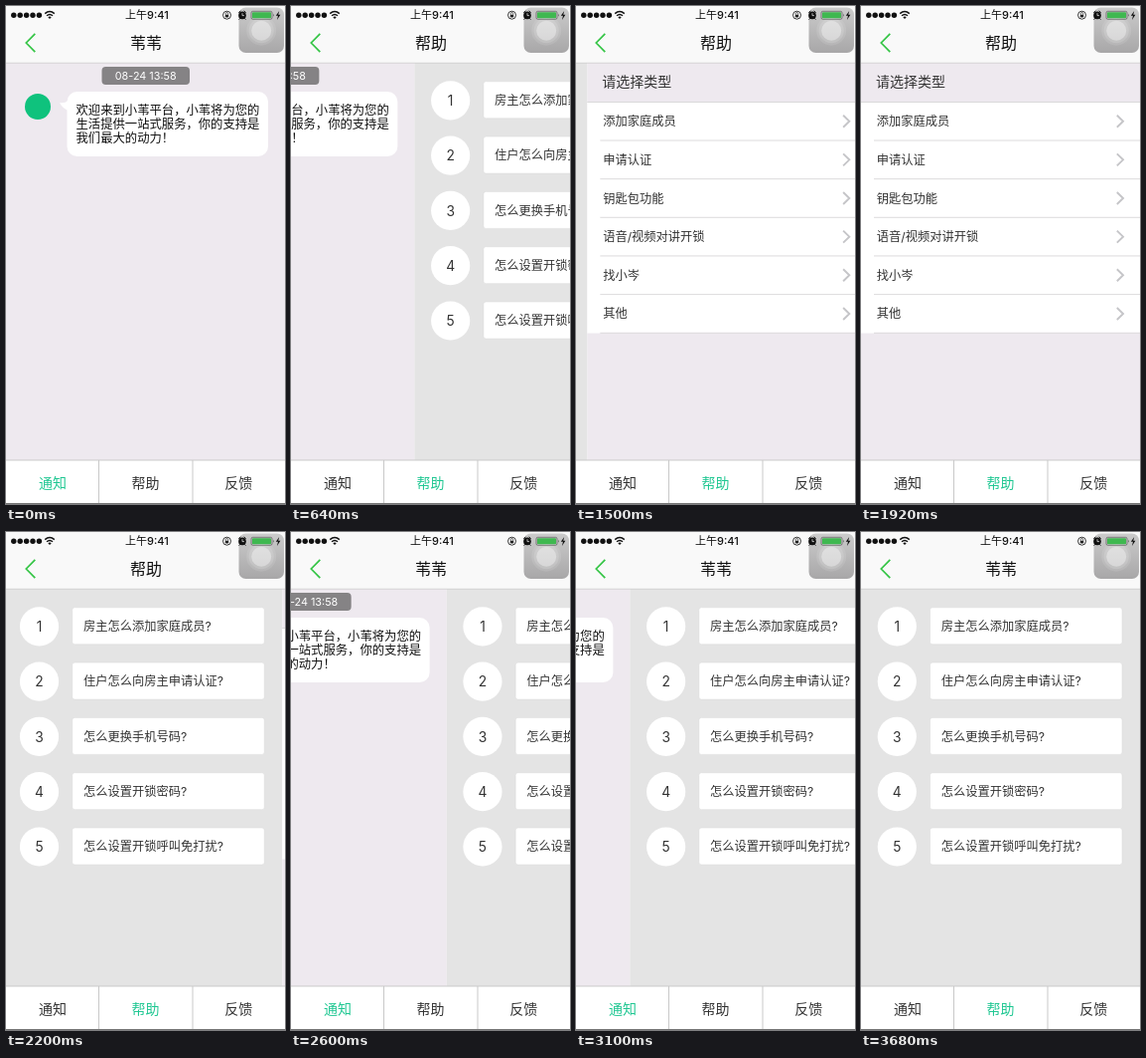
Recreate the animation shown at these times as an HTML page. Size 281 px wide and 500 px high, loop 3800 ms.

```html
<!DOCTYPE html>
<html lang="zh-CN">
<head>
<meta charset="utf-8">
<title>帮助</title>
<style>
html, body { margin: 0; width: 100%; height: 100%; overflow: hidden; background: #fff; }
svg { display: block; width: 100%; height: 100%; }
text { font-family: Inter, "Noto Sans CJK SC", "Noto Sans CJK", sans-serif; fill: #333; white-space: pre; }
</style>
</head>
<body>
<svg id="stage" viewBox="0 0 281 500">
  <defs>
    <clipPath id="view"><rect y="57" width="281" height="399"/></clipPath>
    <linearGradient id="shade" x2="0" y2="1">
      <stop offset="0" stop-color="#cbcbcb"/><stop offset="1" stop-color="#a8a7a8"/>
    </linearGradient>
  </defs>
  <g clip-path="url(#view)"><g id="pages">
    <g id="notice"><rect y="57" width="281" height="399" fill="#eee9ef"/></g>
    <g id="help" transform="translate(281 0)"><rect y="57" width="281" height="399" fill="#e4e4e4"/></g>
    <g id="feedback" transform="translate(562 0)"><rect y="57" width="281" height="399" fill="#eee9ef"/></g>
  </g></g>
  <g id="header">
    <rect width="281" height="57" fill="#f9f9f9"/>
    <path d="M0 57.2H281" stroke="#c8c8c8" stroke-width=".7"/>
    <path d="M29.3 27.8L20.3 37L29.3 46.2" fill="none" stroke="#35c546" stroke-width="1.7"/>
  </g>
  <g id="bar">
    <rect y="456" width="281" height="44" fill="#fff"/>
    <path d="M0 456H281M93.5 456V499M188 456V499" stroke="#c9c9c9"/>
    <path d="M0 499.5H281" stroke="#777"/>
  </g>
  <g id="assist">
    <rect x="234.5" y="1.5" width="45.5" height="45.5" rx="7" fill="url(#shade)"/>
    <circle cx="257.2" cy="24.7" r="15" fill="#fff" fill-opacity=".1"/>
    <circle cx="257.2" cy="24.7" r="12.6" fill="#fff" fill-opacity=".14"/>
    <circle cx="257.2" cy="24.7" r="10" fill="#fff" fill-opacity=".36"/>
  </g>
  <g id="status">
    <path d="M39.2 7.6Q44 3.4 48.8 7.6M41 9.8Q44 7.2 47 9.8" fill="none" stroke="#111" stroke-width="1.5"/>
    <path d="M42.3 11.2Q44 9.8 45.7 11.2L44 13Z" fill="#111"/>
    <circle cx="222.5" cy="9.2" r="4" fill="none" stroke="#222" stroke-width=".9"/>
    <path d="M220.8 8.8h3.4v2.6h-3.4z" fill="#222"/>
    <path d="M221.4 8.8V7.6a1.1 1.1 0 0 1 2.2 0V8.8" fill="none" stroke="#222" stroke-width=".7"/>
    <circle cx="238" cy="9.4" r="3.8" fill="#111"/>
    <path d="M234.3 6.7l2-1.8M241.7 6.7l-2-1.8M235.6 12.4l-1 1.2M240.4 12.4l1 1.2" stroke="#111"/>
    <path d="M238 7.2V9.6H239.9" fill="none" stroke="#ddd" stroke-width=".8"/>
    <rect x="247" y="5.3" width="21" height="8" rx="1.6" fill="none" stroke="#444" stroke-width=".6"/>
    <rect x="248" y="6.3" width="19" height="6" rx=".8" fill="#3fb850"/>
    <path d="M269 7.8q1.4 1.5 0 3z" fill="#444"/>
    <path d="M275.2 5L271.8 9.8H274L272.9 14L276.4 8.8H274.2Z" fill="#111"/>
  </g>
</svg>
<script>
const LOOP = 3800, WIDTH = 281, GREEN = '#1fc792';
const $ = id => document.getElementById(id);

function add(parent, tag, attrs, content = '') {
  const node = document.createElementNS('http://www.w3.org/2000/svg', tag);
  for (const key in attrs) node.setAttribute(key, attrs[key]);
  node.textContent = content;
  return parent.appendChild(node);
}

// Places text by its vertical middle.
function label(parent, content, x, middle, size, attrs = {}) {
  return add(parent, 'text', { x, y: middle + size * 0.37, 'font-size': size, ...attrs }, content);
}
const centred = { 'text-anchor': 'middle' };

function buildNotice(g) {
  add(g, 'rect', { x: 96.5, y: 61, width: 88.5, height: 18, rx: 4, fill: '#858385' });
  label(g, '08-24 13:58', 140.7, 70, 10.8, { ...centred, style: 'fill:#fff' });
  add(g, 'circle', { cx: 32, cy: 101, r: 13, fill: '#0fc27d' });
  add(g, 'path', { d: 'M54 97Q60 98 63 94V105Q57 103 54 97Z', fill: '#fff' });
  add(g, 'rect', { x: 61.5, y: 86, width: 202.5, height: 65, rx: 10, fill: '#fff' });
  ['欢迎来到小苇平台\uff0c小苇将为您的', '生活提供一站式服务\uff0c你的支持是', '我们最大的动力\uff01'].forEach((line, i) =>
    label(g, line, 70.5, 104 + i * 14.2, 12.33, { style: 'fill:#111' }));
}

function buildHelp(g) {
  ['房主怎么添加家庭成员?', '住户怎么向房主申请认证?', '怎么更换手机号码?', '怎么设置开锁密码?', '怎么设置开锁呼叫免打扰?'].forEach((line, i) => {
    const y = 94.8 + i * 55.3;
    add(g, 'circle', { cx: 36.3, cy: y, r: 19.6, fill: '#fff' });
    label(g, i + 1, 36.3, y, 13.8, centred);
    add(g, 'rect', { x: 69.5, y: y - 19, width: 193.5, height: 37, rx: 2.5, fill: '#fff', stroke: '#d9d9d9', 'stroke-width': 0.5 });
    label(g, line, 80.7, y - 0.3, 12.25);
  });
}

function buildFeedback(g) {
  label(g, '请选择类型', 15, 76.3, 14);
  add(g, 'rect', { y: 96.5, width: WIDTH, height: 232, fill: '#fff' });
  add(g, 'path', { d: 'M0 96.5H281', stroke: '#d4d2d4', 'stroke-width': 0.8 });
  ['添加家庭成员', '申请认证', '钥匙包功能', '语音/视频对讲开锁', '找小岑', '其他'].forEach((line, i) => {
    const y = 115.7 + i * 38.65;
    label(g, line, 15.8, y, 12.25);
    add(g, 'path', { d: `M257.8 ${y - 6}l6.2 6l-6.2 6`, fill: 'none', stroke: '#c5c5c8', 'stroke-width': 1.9 });
    add(g, 'path', { d: `M13 ${y + 19.3}H281`, stroke: '#d4d2d4', 'stroke-width': 0.8 });
  });
}

buildNotice($('notice'));
buildHelp($('help'));
buildFeedback($('feedback'));

for (let i = 0; i < 5; i++) add($('status'), 'circle', { cx: 7.8 + i * 6.4, cy: 9.3, r: 2.7, fill: '#111' });
label($('status'), '上午9:41', 142, 9.4, 11, { ...centred, 'font-weight': 500, style: 'fill:#111' });
const title = label($('header'), '', 141, 37, 16, { ...centred, style: 'fill:#111' });
const tabs = ['通知', '帮助', '反馈'].map((name, i) => label($('bar'), name, 47 + i * 93.6, 478.7, 14, centred));
const titles = ['苇苇', '帮助', '反馈'];

// Taps switch title and tab at once; swipes only switch the tab when they settle.
const moves = [
  { start: 480, end: 780, to: 1, tap: true },
  { start: 1225, end: 1660, to: 2 },
  { start: 1920, end: 2220, to: 1, tap: true },
  { start: 2440, end: 2740, to: 0, tap: true },
  { start: 2940, end: 3340, to: 1 }
];

const clamp = u => Math.min(1, Math.max(0, u));
const easeInOut = u => (1 - Math.cos(Math.PI * u)) / 2;
const easeOut = u => 1 - (1 - u) ** 3.19;

function render(t) {
  let page = 0, tab = 0, heading = 0;
  for (const { start, end, to, tap } of moves) {
    if (t < start) break;
    const u = clamp((t - start) / (end - start));
    page += (to - page) * (tap ? easeInOut(u) : easeOut(u));
    if (tap) heading = to;
    if (tap || u === 1) tab = to;
  }
  $('pages').setAttribute('transform', `translate(${-page * WIDTH} 0)`);
  title.textContent = titles[heading];
  tabs.forEach((node, i) => node.style.fill = i === tab ? GREEN : '#333');
}

const origin = performance.now();
function tick() {
  render((performance.now() - origin) % LOOP);
  requestAnimationFrame(tick);
}
tick();
</script>
</body>
</html>
```
